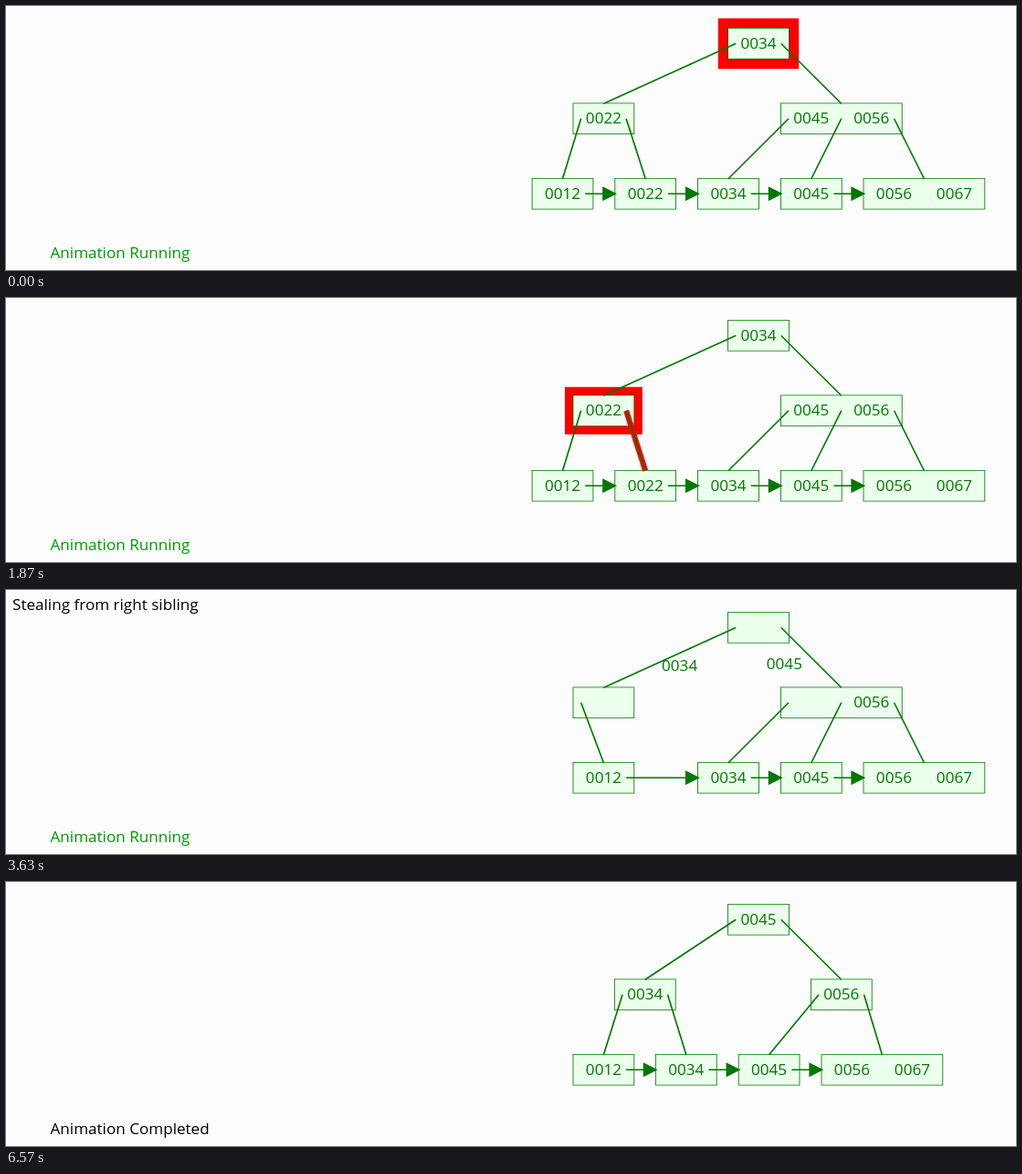
Animation, 1106 px wide and 290 px high, one loop 6610 ms. Source, as an HTML page with a canvas:

```html
<!DOCTYPE html>
<html lang="en">
<head>
<meta charset="utf-8">
<title>B+ tree deletion</title>
<style>
html, body { margin: 0; width: 100%; height: 100%; overflow: hidden; background: #fdfdfd; }
canvas { display: block; }
</style>
</head>
<body>
<canvas id="stage" width="1106" height="290"></canvas>
<script>
const ctx = document.getElementById('stage').getContext('2d');
const LOOP = 6610, STEP = 585, START = -177;
const UNIT = 1.65, HALF = 10 * UNIT;
const GREEN = '#007700', RED = '#ff0000', FILL = '#ecfeec', PAGE = '#fdfdfd';
const FONT = '17.1px "Open Sans", "Noto Sans", sans-serif';
const ROWS = [41.25, 123.75, 206.25];

// name: [row, x before, x after]
const PLACES = {
  root:  [0, 824, 824],
  left:  [1, 654.4, 699.8],
  right: [1, 914.8, 914.8],
  a: [2, 609.5, 654.4],
  b: [2, 700.2, 700.2],
  c: [2, 791, 744.8],
  d: [2, 881.8, 835.6],
  e: [2, 1005.4, 959.4]
};

const mix = (from, to, p) => from + (to - from) * p;

function write(text, x, baseline, color, align) {
  ctx.fillStyle = color;
  ctx.textAlign = align;
  ctx.fillText(text, x, baseline);
}

const label = (text, x, y) => write(text, x, y + 5.6, GREEN, 'center');

function box(node, grow, stroke, fill) {
  const w = node.w + 2 * grow, h = 2 * (HALF + grow);
  ctx.lineWidth = UNIT;
  ctx.strokeStyle = stroke;
  ctx.fillStyle = fill;
  ctx.beginPath();
  ctx.rect(node.x - w / 2, node.y - h / 2, w, h);
  ctx.stroke();
  ctx.fill();
}

function drawNode(node, grow) {
  if (node.lit) box(node, grow, RED, RED);
  box(node, 0, GREEN, FILL);
  node.keys.forEach((key, i) =>
    label(key, node.x + (i - (node.keys.length - 1) / 2) * 40 * UNIT, node.y));
}

// Slot 0 sits near the left end, the last slot near the right end.
function tail(node, slot) {
  const n = node.keys.length, inset = 5 * UNIT;
  if (slot === 0) return node.x - node.w / 2 + inset;
  if (slot === n) return node.x + node.w / 2 - inset;
  return node.x - node.w / 2 + slot * 40 * UNIT;
}

function line(x1, y1, x2, y2, width, color) {
  ctx.lineWidth = width;
  ctx.strokeStyle = color;
  ctx.beginPath();
  ctx.moveTo(x1, y1);
  ctx.lineTo(x2, y2);
  ctx.stroke();
}

function drawBranch(from, slot, to, glow) {
  const ends = [tail(from, slot), from.y, to.x, to.y - HALF];
  if (glow) line(...ends, glow, RED);
  line(...ends, UNIT, GREEN);
}

function drawLink(from, to) {
  const tip = to.x - to.w / 2, y = from.y;
  line(tail(from, from.keys.length), y, tip, y, UNIT, GREEN);
  ctx.fillStyle = GREEN;
  ctx.beginPath();
  ctx.moveTo(tip, y);
  ctx.lineTo(tip - 8 * UNIT, y - 4 * UNIT);
  ctx.lineTo(tip - 8 * UNIT, y + 4 * UNIT);
  ctx.closePath();
  ctx.stroke();
  ctx.fill();
}

function scene(step) {
  const merged = step >= 6, moved = step >= 7;
  const keys = {
    root: [moved ? '0045' : merged ? '' : '0034'],
    left: [moved ? '0034' : step >= 5 ? '' : '0022'],
    right: moved ? ['0056'] : [merged ? '' : '0045', '0056'],
    a: ['0012'],
    b: step >= 5 ? [] : ['0022'],
    c: ['0034'],
    d: ['0045'],
    e: ['0056', '0067']
  };
  if (merged) delete keys.b;
  const lit = [['root'], ['root'], ['left'], ['left'], ['b'], ['left', 'a', 'b']][step] || [];
  const branches = [['root', 0, 'left'], ['root', 1, 'right'], ['left', 0, 'a']];
  if (!merged) branches.push(['left', 1, 'b']);
  if (moved) branches.push(['left', 1, 'c'], ['right', 0, 'd'], ['right', 1, 'e']);
  else branches.push(['right', 0, 'c'], ['right', 1, 'd'], ['right', 2, 'e']);
  return {
    keys, lit, branches,
    glow: { 1: 'left', 3: 'b' }[step],
    leaves: merged ? 'acde' : 'abcde',
    note: { 5: 'Merging node', 6: 'Stealing from right sibling' }[step]
  };
}

function draw(t) {
  const clock = (t - START) / STEP;
  const step = Math.min(8, Math.floor(clock)), part = clock - step;
  const move = step < 7 ? 0 : step === 7 ? part : 1;
  const pulse = 8.1 + t / 210;
  const grow = (Math.abs(pulse % 10 - 5) + 3.2) * UNIT;
  const glow = (Math.abs(pulse / 2 % 6 - 3) + 3.2) * UNIT;
  const s = scene(step);

  ctx.fillStyle = PAGE;
  ctx.fillRect(0, 0, 1106, 290);
  ctx.font = FONT;

  const nodes = {};
  for (const name in s.keys) {
    const [row, before, after] = PLACES[name], keys = s.keys[name];
    // The merged leaf jumps to its new place before the rest slides.
    const p = name === 'a' && step >= 6 ? 1 : move;
    nodes[name] = {
      keys, x: mix(before, after, p), y: ROWS[row],
      w: (keys.length ? keys.length * 40 : 10) * UNIT,
      lit: s.lit.includes(name)
    };
    drawNode(nodes[name], grow);
  }
  for (const [from, slot, to] of s.branches)
    drawBranch(nodes[from], slot, nodes[to], s.glow === to && glow);
  for (let i = 1; i < s.leaves.length; i++)
    drawLink(nodes[s.leaves[i - 1]], nodes[s.leaves[i]]);

  if (step === 6) {
    const { root, left, right } = nodes;
    label('0045', mix(right.x - 20 * UNIT, root.x, part), mix(right.y, root.y, part));
    label('0034', mix(root.x, left.x, part), mix(root.y, left.y, part));
  }
  if (s.note) write(s.note, 7, 21.8, '#000000', 'left');
  if (step < 8) write('Animation Running', 48.5, 277.4, '#009900', 'left');
  else write('Animation Completed', 48.5, 277.4, '#000000', 'left');
}

const begin = performance.now();
function tick() {
  draw((performance.now() - begin) % LOOP);
  requestAnimationFrame(tick);
}
tick();
</script>
</body>
</html>
```
